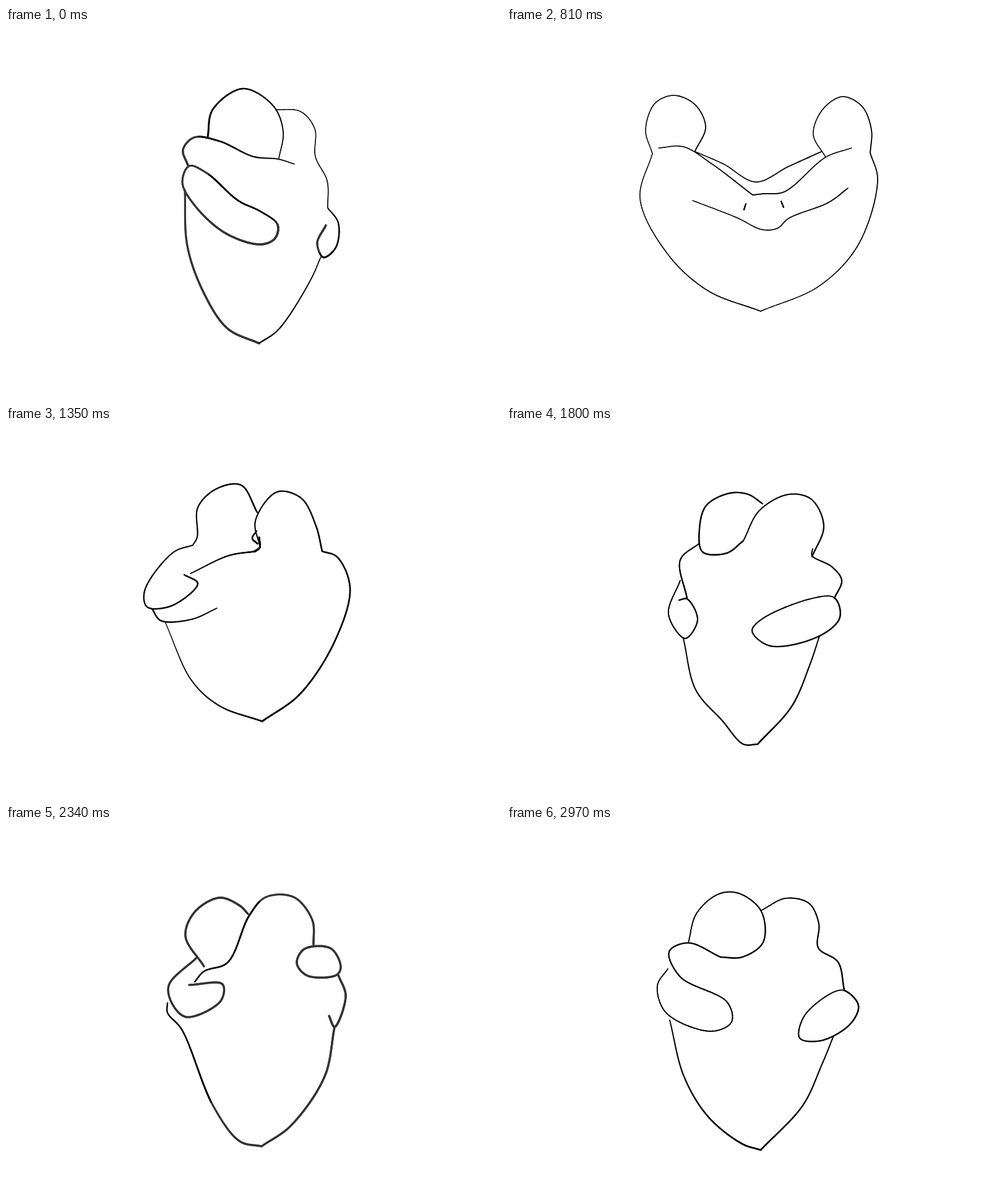
An HTML page with a canvas for the animation above (3.06 s loop, 800 px wide and 600 px high).

```html
<!DOCTYPE html>
<html>
<head>
<meta charset="utf-8">
<style>
html, body { margin: 0; width: 100%; height: 100%; overflow: hidden; background: #fff; }
canvas { display: block; }
</style>
</head>
<body>
<canvas id="stage" width="800" height="600"></canvas>
<script>
const ctx = document.getElementById('stage').getContext('2d');
const SAMPLES = 90, LOOP = 3060;
const keys = [];
const mix = (a, b, u) => a + (b - a) * u;

// Evenly spaced [x, y] samples on a smooth curve through the points
function sample(text) {
  const n = text.split(' ').map(Number), pts = [];
  for (let i = 0; i < n.length; i += 2) pts.push([n[i], n[i + 1]]);
  const last = pts.length - 1;
  const closed = last > 2 && pts[0].join() === pts[last].join();
  const at = i => closed ? pts[(i + last) % last] : pts[Math.max(0, Math.min(last, i))];
  const gap = (p, q) => Math.sqrt(Math.hypot(q[0] - p[0], q[1] - p[1])) || 1;
  const fine = [], len = [0];
  for (let i = 0; i < last; i++) {
    const [p, q, r, s] = [-1, 0, 1, 2].map(d => at(i + d));
    const a = gap(p, q), b = gap(q, r), c = gap(r, s);
    for (let j = 0; j <= 20; j++) {
      const u = j / 20, v = 1 - u;
      fine.push([0, 1].map(k => {
        const before = (q[k] - p[k]) / a, here = (r[k] - q[k]) / b, after = (s[k] - r[k]) / c;
        const m0 = p === q ? here : (before * b + here * a) / (a + b);
        const m1 = r === s ? here : (here * c + after * b) / (b + c);
        return v * v * (1 + 2 * u) * q[k] + u * u * (3 - 2 * u) * r[k] + b * u * v * (v * m0 - u * m1);
      }));
    }
  }
  for (let i = 1; i < fine.length; i++)
    len.push(len[i - 1] + Math.hypot(fine[i][0] - fine[i - 1][0], fine[i][1] - fine[i - 1][1]));
  const out = [];
  for (let s = 0, i = 0; s <= SAMPLES; s++) {
    const d = len[len.length - 1] * s / SAMPLES;
    while (i < fine.length - 2 && len[i + 1] < d) i++;
    const u = (d - len[i]) / (len[i + 1] - len[i] || 1);
    out.push([0, 1].map(k => mix(fine[i][k], fine[i + 1][k], u)));
  }
  return out;
}

// Strokes with the same id turn into each other from pose to pose
function pose(step, thin, thick) {
  keys.push({ step, thin, thick, lines: {} });
}
function stroke(id, text, w0, w1) {
  const key = keys[keys.length - 1];
  w0 = w0 || key.thin;
  w1 = w1 || key.thick;
  key.lines[id] = sample(text).map(([x, y], i) => [x, y, mix(w0, w1, i / SAMPLES)]);
}

// Embrace
pose(0, 1.4, 1.5);
stroke('A', '326 176 334 132 383 98 432 126 448 168 441 211', 3);
stroke('B', '436 132 476 135 499 163 500 208 519 247 520 291');
stroke('C', '289 262 293 352 319 427 358 486 409 510', 3.1, 3.6);
stroke('D', '409 510 440 488 492 408 509 370', 2.2);
stroke('E', '294 222 286 197 304 177 345 183 400 208 440 212 466 220', 3.6);
stroke('F', '439 318 412 297 375 279 325 235 296 223 285 250 305 287 355 332 412 350 435 340 439 318', 2.6, 3.8);
stroke('G', '520 291 537 315 533 355 513 371 503 348 517 319', 1.8, 3.5);

// Parting
pose(3, 1.7, 2.2);
stroke('A', '329 190 320 152 356 106 400 114 418 172 407 205 425 218 440 246');
stroke('B', '456 222 442 186 461 133 500 128 536 175 515 218 529 248 531 292', 2.6, 1.8);
stroke('C', '329 190 306 219 283 252 290 330 338 437 380 487 418 492');
stroke('D', '418 492 475 442 515 352 531 292');
stroke('E', '289 278 312 340 338 367 383 353 405 321');
stroke('F', '466 222 439 248 428 278 385 228 349 210 340 240 375 294 430 330 486 293');
stroke('G', '531 295 533 309 525 328');
stroke('H', '342 316 358 304 379 298');
stroke('I', '337 244 350 270 359 303');

// Arm's length; the first one leans right
function arms(step) {
  pose(step, 1.4, 1.8);
  stroke('A', '235 203 224 165 239 122 270 109 304 124 321 160 304 199');
  stroke('B', '515 209 495 172 510 132 542 111 574 127 589 165 587 202');
  stroke('C', '235 203 215 276 260 366 325 425 410 458');
  stroke('D', '410 458 505 417 568 350 599 245 587 202');
  stroke('E', '300 279 372 307 412 326 437 324 455 308 520 282 551 259');
  stroke('F', '557 194 515 209 448 265 415 268 397 270');
  stroke('G', '443 280 447 290');
  stroke('H', '304 200 350 220 402 249 455 224 508 200');
  stroke('I', '245 194 285 192 330 219 397 270');
  stroke('J', '386 284 383 294');
}
arms(6);
for (const line of Object.values(keys[2].lines))
  for (const p of line) p[0] = p[0] * 0.98 + 33;
arms(8);

// Cuddle
pose(14, 1.9, 2.5);
stroke('A', '302 191 309 178 310 130 340 100 380 94 406 138');
stroke('B', '411 195 403 152 438 105 477 115 501 160 511 201');
stroke('C', '257 315 300 410 345 451 414 476', 1.2);
stroke('D', '414 476 475 432 532 345 556 260 535 210 511 201', 2.8);
stroke('E', '236 294 250 313 300 311 341 293', 2.4, 1.6);
stroke('F', '404 201 360 208 298 237', 2.4, 1.6);
stroke('H', '405 168 398 180 407 189');
stroke('I', '302 191 270 203 224 265 228 291 268 289 310 253 288 239');
stroke('K', '409 178 410 195 402 201', 2.4, 3);

// Turn
pose(19, 1.8, 2.3);
stroke('A', '382 184 355 204 316 202 311 165 322 127 360 107 390 109 413 124', 2.4);
stroke('B', '382 184 408 135 455 109 492 117 512 160 493 210');
stroke('C', '285 342 305 425 348 475 382 513 405 513');
stroke('D', '405 513 460 452 490 383 505 338', 2.6, 1.8);
stroke('E', '280 248 261 303 288 342 308 312 291 278 278 280');
stroke('G', '529 276 538 308 505 338 425 354 396 330 410 312 490 278 529 276', 2.5, 1.8);
stroke('I', '311 188 280 215 291 277');
stroke('J', '494 197 493 208 525 226 541 248 529 277');

// Sway
pose(25, 3.3, 3.5);
stroke('A', '320 227 290 178 305 139 345 116 378 129 391 142');
stroke('B', '305 252 320 235 358 221 393 145 420 115 465 115 495 152 497 194', 2.4);
stroke('C', '261 286 261 302 284 329 335 453 378 510 413 518', 2.2);
stroke('D', '413 518 460 485 515 405 531 325');
stroke('G', '525 198 541 228 534 241 487 242 470 222 482 199 525 198');
stroke('I', '308 213 263 258 270 290 292 309 347 283 350 256 296 257');
stroke('J', '537 241 549 275 531 325 522 307');

// Hold
pose(32, 1.8, 2.4);
stroke('A', '293 189 306 142 342 110 375 109 411 138 414 188 380 212 345 212');
stroke('B', '412 136 450 117 488 125 504 158 503 197 535 220 545 265');
stroke('C', '263 314 286 405 325 470 380 514 410 524', 1.8, 2.8);
stroke('D', '410 524 478 452 508 388 528 339', 2.6, 1.8);
stroke('G', '545 266 568 290 555 320 508 347 473 343 480 308 525 270 545 266', 2.6, 1.8);
stroke('I', '260 231 243 258 257 302 330 332 363 317 356 285 280 244 262 203 293 189 345 212');

function drawingAt(t) {
  if (t < 150) return 0;
  if (t < 810) return Math.min(7, 1 + Math.floor((t - 150) / 90));
  return 8 + Math.floor((t - 810) / 90);
}

function drawLine(line) {
  for (let i = 1; i < line.length; i++) {
    const [x, y, w] = line[i];
    ctx.lineWidth = w;
    ctx.strokeStyle = w > 3 ? '#333' : '#000';
    ctx.beginPath();
    ctx.moveTo(line[i - 1][0], line[i - 1][1]);
    ctx.lineTo(x, y);
    ctx.stroke();
  }
}

function draw(n) {
  ctx.fillStyle = '#fff';
  ctx.fillRect(0, 0, 800, 600);
  ctx.lineCap = 'round';
  let k = 0;
  while (k < keys.length - 2 && keys[k + 1].step <= n) k++;
  const a = keys[k], b = keys[k + 1];
  const u = (n - a.step) / (b.step - a.step);
  for (const id of 'ABCDEFGHIJK') {
    const p = a.lines[id], q = b.lines[id];
    if (p && q) drawLine(p.map((v, i) => v.map((c, j) => mix(c, q[i][j], u))));
    else if (p && u < 0.5) drawLine(p);
    else if (q && u >= 0.5) drawLine(q);
  }
}

const start = performance.now();
let shown = -1;
function tick() {
  const n = drawingAt((performance.now() - start) % LOOP);
  if (n !== shown) draw(shown = n);
  requestAnimationFrame(tick);
}
tick();
</script>
</body>
</html>
```
